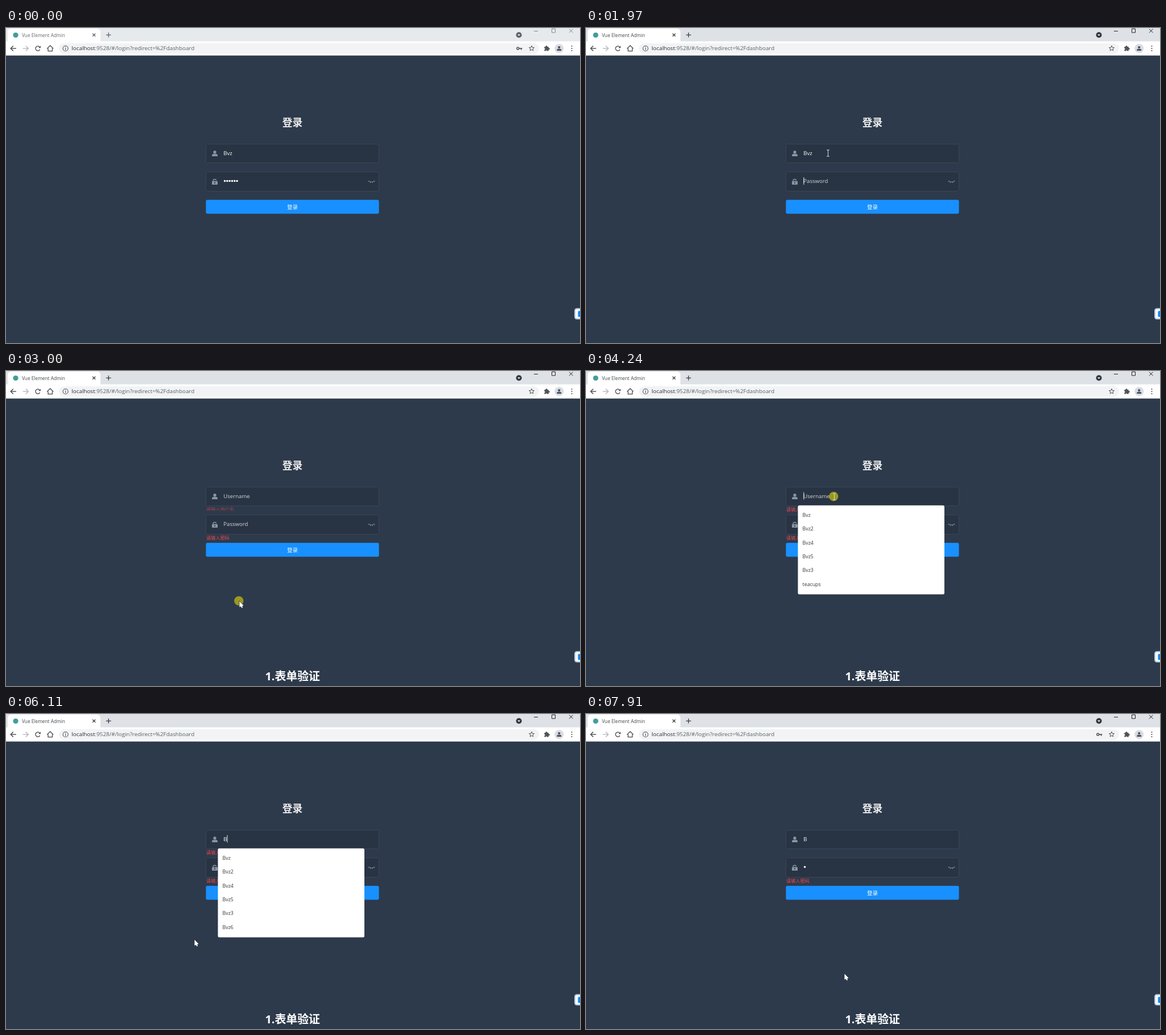
An HTML page with a canvas that plays this animation: 1009x555 px, repeating every 8 s.

```html
<!DOCTYPE html>
<html lang="zh">
<head>
<meta charset="utf-8">
<title>Login form validation</title>
<style>
html, body { margin: 0; width: 100%; height: 100%; overflow: hidden; background: #2d3a4b; }
canvas { display: block; width: 1009px; height: 555px; }
</style>
</head>
<body>
<canvas id="stage" width="1009" height="555"></canvas>
<script>
const ctx = document.getElementById('stage').getContext('2d');
const LOOP = 8000;
const KEY_MS = 76;
const CLICK_MS = 85;
const FADE_MS = 300;
const BLINK_MS = 550;
const LATIN = '"Open Sans", "Noto Sans", sans-serif';
const CJK = '"Noto Sans CJK SC", "Noto Sans CJK", sans-serif';
const USER = 'Bvz';
const ICON = '#8896a2';
const FIELD = '#283443';

const START = { x: 881, y: 537 };
const MOVES = [
  { at: 100, end: 880, x: 435, y: 261 },
  { at: 1740, end: 1960, x: 425, y: 220 },
  { at: 2450, end: 2900, x: 410, y: 405 },
  { at: 3040, end: 3770, x: 436, y: 221 },
  { at: 5730, end: 6110, x: 331, y: 397 },
  { at: 6200, end: 6400, x: 391, y: 288 },
  { at: 6400, end: 6640, x: 419, y: 271 },
  { at: 7600, end: 7905, x: 454, y: 457 }
];

const wakeWindow = { at: 1200, focus: 'pass' };
const pickUser = { at: 2140, focus: 'user' };
const leaveForm = { at: 2930 };
const openList = { at: 4240, focus: 'user' };
const closeList = { at: 6180 };
const pickPass = { at: 6720, focus: 'pass' };
const CLICKS = [wakeWindow, pickUser, leaveForm, openList, closeList, pickPass];

const erasePass = { at: 1280, presses: 6 };
const eraseUser = { at: 2217, presses: USER.length };
const typeUser = { at: 4950, presses: 1 };
const typePass = { at: 7270, presses: 1 };
const TYPING = [erasePass, eraseUser, typeUser, typePass];

const clamp = v => Math.min(1, Math.max(0, v));
const smooth = p => p * p * (3 - 2 * p);
const fade = (t, from) => 1 - Math.pow(1 - clamp((t - from) / FADE_MS), 5);
const last = (list, t) => list.filter(e => e.at <= t).pop();
const pressed = (typing, t) =>
  Math.min(typing.presses, Math.max(0, Math.floor((t - typing.at) / KEY_MS) + 1));

function rect(x, y, w, h, r, fill, stroke) {
  ctx.beginPath();
  ctx.roundRect(x, y, w, h, r);
  if (fill) { ctx.fillStyle = fill; ctx.fill(); }
  if (stroke) { ctx.strokeStyle = stroke; ctx.lineWidth = 1; ctx.stroke(); }
}

function arc(x, y, r, from, to, color, width) {
  ctx.beginPath();
  ctx.arc(x, y, r, from * Math.PI, to * Math.PI);
  ctx.strokeStyle = color;
  ctx.lineWidth = width;
  ctx.stroke();
}

function disc(x, y, r, fill) {
  ctx.beginPath();
  ctx.arc(x, y, r, 0, Math.PI * 2);
  ctx.fillStyle = fill;
  ctx.fill();
}

// Points are a flat list x, y, x, y...
function trace(points) {
  ctx.beginPath();
  for (let i = 0; i < points.length; i += 2) ctx.lineTo(points[i], points[i + 1]);
}

function line(color, width, ...points) {
  trace(points);
  ctx.strokeStyle = color;
  ctx.lineWidth = width;
  ctx.stroke();
}

function shape(fill, ...points) {
  trace(points);
  ctx.fillStyle = fill;
  ctx.fill();
}

function text(str, x, y, size, color, family = LATIN, weight = 400, align = 'left') {
  ctx.font = `${weight} ${size}px ${family}`;
  ctx.textAlign = align;
  ctx.fillStyle = color;
  ctx.fillText(str, x, y);
}

function cross(x, y, r, color, width) {
  line(color, width, x - r, y - r, x + r, y + r);
  line(color, width, x + r, y - r, x - r, y + r);
}

function plus(x, y, r, color) {
  line(color, 1.3, x - r, y, x + r, y);
  line(color, 1.3, x, y - r, x, y + r);
}

function navArrow(x, y, dir, color) {
  const tip = x + 4.8 * dir, back = x + 0.3 * dir;
  line(color, 1.4, x - 4.8 * dir, y, tip, y);
  line(color, 1.4, back, y - 4.5, tip, y, back, y + 4.5);
}

function person(x, y, s, color) {
  disc(x, y - 2.3 * s, 2.6 * s, color);
  rect(x - 5 * s, y + 0.8 * s, 10 * s, 4.2 * s, [3 * s, 3 * s, s, s], color);
}

function star(x, y, color) {
  const points = [];
  for (let i = 0; i <= 10; i++) {
    const a = Math.PI * (i / 5 - 0.5), r = i % 2 ? 2.1 : 4.8;
    points.push(x + r * Math.cos(a), y + r * Math.sin(a));
  }
  line(color, 1, ...points);
}

function keyIcon(x, y, color) {
  arc(x - 2.2, y, 1.9, 0, 2, color, 1.5);
  line(color, 1.7, x, y, x + 5.3, y);
  line(color, 1.7, x + 3.7, y, x + 3.7, y + 2.5);
}

function puzzle(x, y, color) {
  rect(x - 3.7, y - 3, 7.6, 7.6, 1, color);
  disc(x, y - 3.4, 1.5, color);
  disc(x + 4.4, y + 0.6, 1.5, color);
  disc(x - 3.7, y + 1, 1.3, '#fff');
  disc(x, y + 4.7, 1.3, '#fff');
}

function drawTabs(active) {
  const ink = active ? '#3c4043' : '#5f6368', win = active ? '#222' : '#858789';
  rect(0, 0, 1009, 24, 0, active ? '#dee1e6' : '#e7eaed');
  rect(3, 1, 163, 24, [6, 6, 0, 0], '#fff');
  disc(17, 12.5, 4.6, '#429d9b');
  text('Vue Element Admin', 28, 15.6, 8.3, active ? '#45494d' : '#666a6e');
  cross(154.7, 12.2, 2.5, ink, 1.3);
  plus(180.3, 12.3, 4.3, ink);
  disc(901.6, 12.3, 5, active ? '#34383f' : '#5f6368');
  shape('#fff', 899.2, 11.2, 904, 11.2, 901.6, 14);
  line(win, 1, 928, 5.5, 935, 5.5);
  rect(959.5, 1.5, 6, 6.5, 0, null, win);
  cross(993.3, 5, 3.3, win, 1);
}

function drawToolbar(hasKey) {
  const dark = '#44484c', icon = '#505459', y = 36;
  rect(0, 23.5, 1009, 25, 0, '#fff');
  navArrow(13, y, -1, dark);
  navArrow(34.4, y, 1, '#b4b7ba');
  arc(56, y, 4, 0.15, 1.72, dark, 1.4);
  shape(dark, 57, y - 0.8, 60.8, y - 0.8, 60.8, y - 4.8);
  line(dark, 1.3, 72, y + 0.4, 77.7, y - 5, 83.4, y + 0.4);
  line(dark, 1.3, 74, y - 0.5, 74, y + 4.6, 81.4, y + 4.6, 81.4, y - 0.5);

  rect(93, 27, 844, 18, 9, '#f1f3f4');
  arc(104.6, y, 4.5, 0, 2, icon, 1.1);
  line(icon, 1.2, 104.6, y - 0.8, 104.6, y + 2.4);
  line(icon, 1.2, 104.6, y - 2.8, 104.6, y - 1.7);
  const host = 'localhost';
  text(host, 115.3, 39.4, 9.86, '#2b2e32');
  text(':9528/#/login?redirect=%2Fdashboard', 115.3 + ctx.measureText(host).width, 39.4, 9.86, '#5b6065');

  if (hasKey) keyIcon(902, y, icon);
  star(924, y, icon);
  puzzle(950, y, icon);
  disc(972.3, y, 8, '#d9dde3');
  person(972.3, y, 0.82, '#485160');
  for (let i = -1; i <= 1; i++) disc(994.5, y + 4 * i, 1.1, icon);
}

function drawLock(x, y) {
  rect(x - 5, y - 1.2, 10, 6.2, 1, ICON);
  arc(x, y - 1.5, 3, 1, 1.9, ICON, 1.4);
  disc(x, y + 1.5, 1, FIELD);
  rect(x - 0.4, y + 1.5, 0.8, 2, 0, FIELD);
}

function drawEye(x, y) {
  const cy = y - 6, r = 7.3;
  arc(x, cy, r, 0.24, 0.76, ICON, 1);
  for (let i = 0; i < 4; i++) {
    const a = Math.PI * (0.28 + 0.147 * i), c = Math.cos(a), s = Math.sin(a);
    line(ICON, 1, x + r * c, cy + r * s, x + (r + 2) * c, cy + (r + 2) * s);
  }
}

function userValue(t) {
  return t < typeUser.at ? USER.slice(0, USER.length - pressed(eraseUser, t)) : USER[0];
}

function dotCount(t) {
  return erasePass.presses - pressed(erasePass, t) + pressed(typePass, t);
}

function caretOn(t, field) {
  const click = last(CLICKS, t), typing = last(TYPING, t);
  if (!click || click.focus !== field) return false;
  const lastKey = typing ? typing.at + (pressed(typing, t) - 1) * KEY_MS : 0;
  return (t - Math.max(click.at, lastKey)) % (2 * BLINK_MS) < BLINK_MS;
}

function drawField(y, h) {
  rect(351.5, y + 0.5, 304, h - 1, 3, FIELD, '#394656');
}

function drawCaret(x, y) {
  rect(x, y, 1, 13, 0, '#e6e9ec');
}

function drawError(str, y, amount) {
  ctx.save();
  ctx.globalAlpha = amount;
  ctx.translate(0, y);
  ctx.scale(1, amount);
  text(str, 352, 8.2, 8.15, '#f0454a', CJK, 500);
  ctx.restore();
}

function drawForm(t, hover) {
  const hint = '#d4d7db', left = 382.3;
  text('登录', 503.5, 172.8, 17.8, '#eee', CJK, 700, 'center');

  drawField(204, 34);
  person(367, 221, 1, ICON);
  const user = userValue(t);
  text(user || 'Username', left, 223.7, 9.6, user ? '#fff' : hint);
  if (caretOn(t, 'user')) drawCaret(left + (user && ctx.measureText(user).width), 213.5);

  drawField(253, 35);
  drawLock(367, 271);
  drawEye(642.5, 270);
  const dots = dotCount(t);
  for (let i = 0; i < dots; i++) disc(384.6 + 4.3 * i, 269.6, 1.75, '#fff');
  if (!dots) text('Password', left, 273.2, 9.6, hint);
  if (caretOn(t, 'pass')) drawCaret(left + 4.5 * dots, 263);

  drawError('请输入用户名', 239, fade(t, leaveForm.at + 10) * (1 - fade(t, closeList.at)));
  drawError('请输入密码', 289, fade(t, pickUser.at + 10));

  rect(351.4, 302.85, 304.2, 24.3, 2.7, hover ? '#46a6ff' : '#1890ff');
  text('登录', 503.5, 318.7, 9.6, '#fff', CJK, 500, 'center');
}

function drawSuggestions(t) {
  const names = ['', 2, 4, 5, 3].map(n => USER + n);
  names.push(t < typeUser.at ? 'teacups' : USER + 6);
  rect(372.5, 236.8, 257.5, 156.7, 2.5, '#fff');
  names.forEach((name, i) => text(name, 380.6, 257 + 24.35 * i, 8.8, '#33373b'));
}

function drawSideTool() {
  rect(999, 493.5, 20, 20, 4.5, '#a9c0d6');
  rect(1000.8, 495.3, 20, 16.4, 3, '#f6f9fc');
  rect(1005.5, 498.5, 11, 10.5, 1.5, '#1688f0');
}

function pointerAt(t) {
  return MOVES.reduce((p, m) => {
    const k = smooth(clamp((t - m.at) / (m.end - m.at)));
    return { x: p.x + (m.x - p.x) * k, y: p.y + (m.y - p.y) * k };
  }, START);
}

// Typing hides the pointer until it moves again.
function pointerHidden(t) {
  const move = last(MOVES, t), typing = last(TYPING, t - KEY_MS);
  return !move || (typing && typing.at > move.at);
}

function drawArrow(x, y) {
  line('#fff', 2, x + 3, y + 7, x + 5.2, y + 12.2);
  shape('#fff', x, y, x, y + 11, x + 7.8, y + 8);
  line('#1c222b', 0.7, x, y + 11, x, y, x + 7.8, y + 8);
}

function drawHand(x, y) {
  rect(x - 3, y + 5, 8, 7, 2, '#fff', '#1c222b');
  rect(x - 1.2, y, 2.4, 9, 1.2, '#fff');
}

function drawBeam(x, y) {
  const color = '#d5d9dd', r = 5.5;
  line(color, 1, x, y - r, x, y + r);
  for (const end of [y - r, y + r]) line(color, 1, x - 2.5, end, x + 2.5, end);
}

function drawPointer(t, { x, y }, hover, open) {
  const click = last(CLICKS, t);
  if (click && t < click.at + CLICK_MS) disc(x - 0.7, y, 8.2, 'rgba(190,185,20,0.75)');
  if (pointerHidden(t)) return;
  const covered = open && y > 237 && y < 393 && x > 372 && x < 630;
  const inField = x > 378 && x < 630 && ((y > 204 && y < 238) || (y > 253 && y < 287.5));
  if (inField && !covered) drawBeam(Math.floor(x) + 0.5, Math.floor(y) + 0.5);
  else if (hover) drawHand(x, y);
  else drawArrow(x, y);
}

function draw(t) {
  const p = pointerAt(t);
  const open = t >= openList.at && t < closeList.at;
  const hover = !pointerHidden(t) && !open && p.x > 351 && p.x < 656 && p.y > 303 && p.y < 327;

  rect(0, 0, 1009, 555, 0, '#2d3a4b');
  drawTabs(t >= wakeWindow.at);
  drawToolbar(dotCount(t) > 0);
  drawForm(t, hover);
  if (open) drawSuggestions(t);
  if (t >= leaveForm.at + 70)
    text('1.表单验证', 503.7, 545.4, 19.9, '#fff', `"Open Sans", ${CJK}`, 700, 'center');
  drawSideTool();
  drawPointer(t, p, hover, open);
}

const start = performance.now();
function loop() {
  draw((performance.now() - start) % LOOP);
  requestAnimationFrame(loop);
}
loop();
</script>
</body>
</html>
```
